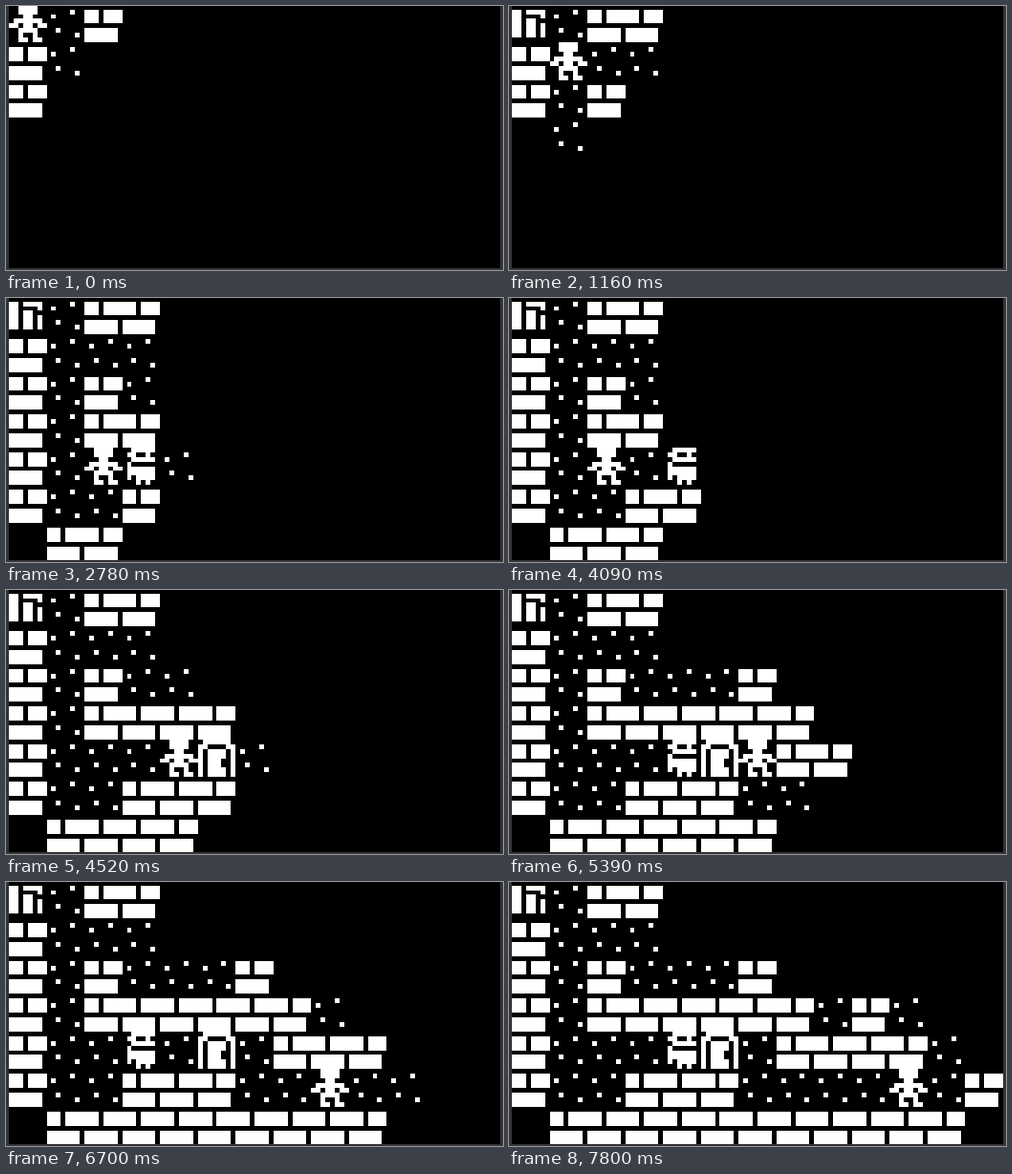
An HTML page with a canvas for the animation above (8 s loop, 520x277 px).

```html
<!DOCTYPE html>
<html lang="en">
<head>
<meta charset="utf-8">
<title>Dungeon walk</title>
<style>
html, body { margin: 0; width: 100%; height: 100%; overflow: hidden; background: #333; }
canvas { display: block; }
</style>
</head>
<body>
<canvas id="stage" width="520" height="277"></canvas>
<script>
const ctx = document.getElementById('stage').getContext('2d');
const LOOP = 8000, PIXEL = 4.9422, LEFT = 3, TOP = -1.38, TILE = 8, SIGHT = 2;

// # wall, . floor, < stairs, d door
const map = [
  '<.##',
  '#...',
  '#.#...#',
  '#.######.#.',
  '#....d.####.',
  '#..###......#',
  ' ###########'
];

// one letter per step, and when each step is taken
const path = 'RDDDDRDURRRRDRRRR';
const times = [500, 1160, 1590, 2020, 2350, 2780, 3440, 4090, 4420, 4520,
  5070, 5390, 5840, 6390, 6700, 7250, 7800];
const dirs = { R: [1, 0], D: [0, 1], U: [0, -1] };

const walk = [[0, 0]];
for (const key of path) {
  const [x, y] = walk[walk.length - 1], [dx, dy] = dirs[key];
  walk.push([x + dx, y + dy]);
}

const px = i => Math.round(LEFT + i * PIXEL);
const py = i => Math.round(TOP + i * PIXEL);

// rectangle in art pixels, snapped to the screen
function box(x, y, w, h, color) {
  ctx.fillStyle = color;
  ctx.fillRect(px(x), py(y), px(x + w) - px(x), py(y + h) - py(y));
}

// each sprite draws with p(x, y, w, h) inside its 8 x 8 cell
const sprites = {
  '#'(p) {
    p(0, 1, 3, 3);
    p(4, 1, 4, 3);
    p(0, 5, 7, 3);
  },
  '.'(p) {
    p(5, 1);
    p(1, 2);
    p(2, 5);
    p(6, 6);
  },
  '<'(p) {
    p(0, 1, 2, 6);
    p(3, 1, 4);
    p(6, 2);
    p(3, 3, 2, 4);
    p(6, 4, 1, 3);
  },
  d(p) {
    p(1, 0, 6);
    for (const side of [0, 1]) {
      p(side * 6, 1, 2);
      p(side * 7, 2, 1, 6);
    }
    p(2, 2, 4, 6);
    p(5, 4, 1, 2, '#000');
  },
  hero(p) {
    p(2, 0, 4, 2);
    p(3, 2, 2, 3);
    p(1, 3, 6);
    p(2, 5, 4);
    for (const side of [0, 1]) {
      p(side * 6, 4, 2);
      p(2 + side * 3, 6);
      p(2 + side * 3, 7, 2);
    }
  },
  ghost(p) {
    p(1, 1, 6, 6);
    p(2, 0, 5);
    p(3, 1, 2, 1, '#000');
    p(6, 1, 1, 1, '#000');
    p(1, 2, 1, 1, '#000');
    p(2, 3, 5, 1, '#000');
    p(2, 6, 1, 1, '#000');
    p(3, 7);
    p(5, 7);
  }
};

function stamp(name, col, row) {
  const p = (x, y, w = 1, h = 1, color = '#fff') =>
    box(col * TILE + x, row * TILE + y, w, h, color);
  p(0, 0, TILE, TILE, '#000');
  sprites[name](p);
}

function draw(t) {
  const steps = walk.slice(0, 1 + times.filter(s => s <= t).length);
  const seen = (c, r) => steps.some(([x, y]) => Math.abs(x - c) + Math.abs(y - r) <= SIGHT);
  // the ghost paces between two cells at a steady beat
  const ghost = [4 - Math.floor((t + 390) / 1965) % 2, 4];

  ctx.fillStyle = '#333';
  ctx.fillRect(0, 0, 520, 277);
  box(0, 0, 13 * TILE, 7 * TILE, '#000');
  map.forEach((line, r) => {
    [...line].forEach((tile, c) => {
      if (tile !== ' ' && seen(c, r)) stamp(tile, c, r);
    });
  });
  if (seen(...ghost)) stamp('ghost', ...ghost);
  stamp('hero', ...steps[steps.length - 1]);
}

const start = performance.now();
function tick() {
  draw((performance.now() - start) % LOOP);
  requestAnimationFrame(tick);
}
tick();
</script>
</body>
</html>
```
